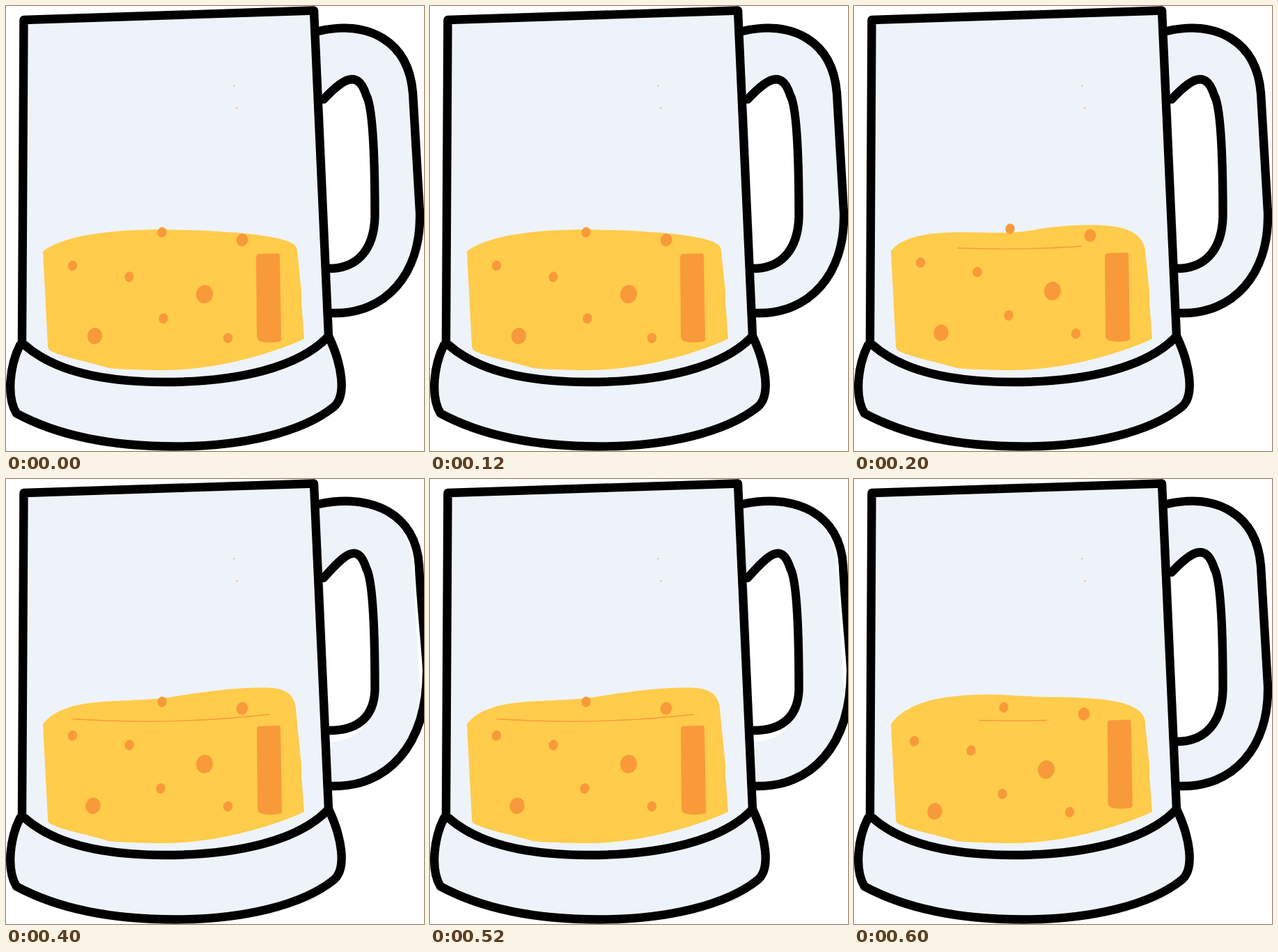
Recreate the animation shown at these times as an HTML page. Size 600 by 639 pixels, loop 800 ms.

```html
<!DOCTYPE html>
<html lang="en">
<head>
<meta charset="utf-8">
<title>Beer mug</title>
<style>
html, body { margin: 0; width: 100%; height: 100%; overflow: hidden; background: #fff; }
svg { display: block; width: 100%; height: 100%; }
.glass { fill: #eef3fa; }
.amber { fill: #f99a3a; }
.ink { fill: none; stroke: #000; stroke-width: 12.4; stroke-linecap: round; stroke-linejoin: round; }
.ink.glass { fill: #eef3fa; }
</style>
</head>
<body>
<svg viewBox="0 0 600 639">
  <path class="glass" d="M449 36C520 20 578 50 584 125L594 297C596 385 545 443 468 441Z"/>
  <path id="hole" fill="#fff"/>
  <path id="outer" class="ink"/>
  <path id="inner" class="ink"/>
  <path class="glass" d="M25.5 20L442 6.5L463 474C420 520 330 540 228 540C140 540 70 525 23 486Z"/>
  <path class="ink" d="M23 486L25.5 20L442 6.5L463 474"/>
  <path class="ink glass" d="M20 487C6 515 0 560 15 585C80 620 160 632.5 243 632.5C340 632.5 425 612 470 576C490 560 482 514 463 474C420 520 330 540 228 540C140 540 70 525 27 487Z"/>
  <path id="beer" fill="#ffcc4b"/>
  <path id="ripple" fill="none" stroke="#f99a3a" stroke-width="1.3" stroke-linecap="round"/>
  <path id="shine" class="amber" d="M364 355L391 354Q394 354 394 358L396 474Q398 480 391 481Q380 483 369 481Q362 480 361 474L360 360Q360 355 364 355Z"/>
  <g id="bubbles" class="amber"></g>
  <g class="amber"><circle cx="327" cy="114.5" r="1"/><circle cx="331.5" cy="146.5" r="1"/></g>
</svg>
<script>
const $ = id => document.getElementById(id);
const set = (id, d) => $(id).setAttribute('d', d);

// x, y, radius, then the offset in the resting pose
const bubbles = [
  [224, 320, 7, 0, 5], [339, 329.5, 8.7, 0, 6.5], [95.5, 368.5, 7, 0, 4.5],
  [177, 382, 7, 0, 7], [285, 409.3, 12.6, 0, 4.5], [222, 444.3, 7, 4, 4.5],
  [125, 469.3, 11.2, 2.3, 4.5], [318.5, 470.3, 7, 0, 6.5]
];
const dots = bubbles.map(([, , r]) => {
  const e = document.createElementNS('http://www.w3.org/2000/svg', 'ellipse');
  e.setAttribute('rx', r * 0.95);
  e.setAttribute('ry', r * 1.06);
  return $('bubbles').appendChild(e);
});

const rest = {
  outer: 'M449 36C520 20 578 50 584 125L594 297C596 385 545 443 468 441',
  inner: 'M456 134C483 105 505 90 517 128C527 145 529.5 220 529.5 303C528 350 504 377 464 377'
};
const bent = {
  outer: 'M449 36C525 20 589 50 593 125C595 170 600 215 604 270C606 385 545 443 468 441',
  inner: 'M456 142C486 108 505 90 517 128C527 145 529.5 220 529.5 303C528 343 504 361 464 361'
};

const poses = [
  { top: 'C85 329 150 321 224 321C300 322 375 327 405 338Q418 343 418 352',
    ripple: '', shine: [-1, 1.3], shift: [0, 0], settle: 1, handle: rest },
  { top: 'C70 330 110 325 150 325C200 325 220 327 250 323C300 313 360 312 385 319C410 326 417 340 418 352',
    ripple: 'M149 347.5Q240 351 327 345', shine: [0, 0], shift: [0, 0], settle: 0, handle: rest },
  { top: 'C70 330 100 322 150 319C200 317 220 316 250 311C300 303 350 298 382 300C412 303 416 318 417 340L418 352',
    ripple: 'M96 344.5Q240 354 378 338', shine: [0, 0], shift: [0, 0], settle: 0, handle: bent },
  { top: 'C75 322 120 310 190 309.5C220 309 240 313 290 313C350 314 390 318 408 332C416 338 418 345 418 352',
    ripple: 'M180 346.5Q228 348 276 346.5', shine: [3.7, -8.5], shift: [-9, 8], settle: 0, handle: rest }
];
const beerBase = 'L424 410V425L428 478C380 500 300 523 225 523C190 523 160 521 148 520C120 511 90 507 63 495Q60 492 60 488Z';

function draw() {
  const p = poses[Math.floor(performance.now() % 800 / 200)];
  set('beer', 'M53 352' + p.top + beerBase);
  set('ripple', p.ripple);
  set('outer', p.handle.outer);
  set('inner', p.handle.inner);
  set('hole', rest.inner + 'Z');
  $('shine').setAttribute('transform', `translate(${p.shine})`);
  bubbles.forEach(([x, y, r, dx, dy], i) => {
    const cx = x + p.shift[0] + dx * p.settle, cy = y + p.shift[1] + dy * p.settle;
    dots[i].setAttribute('transform', `translate(${cx} ${cy}) rotate(12)`);
  });
  requestAnimationFrame(draw);
}
draw();
</script>
</body>
</html>
```
